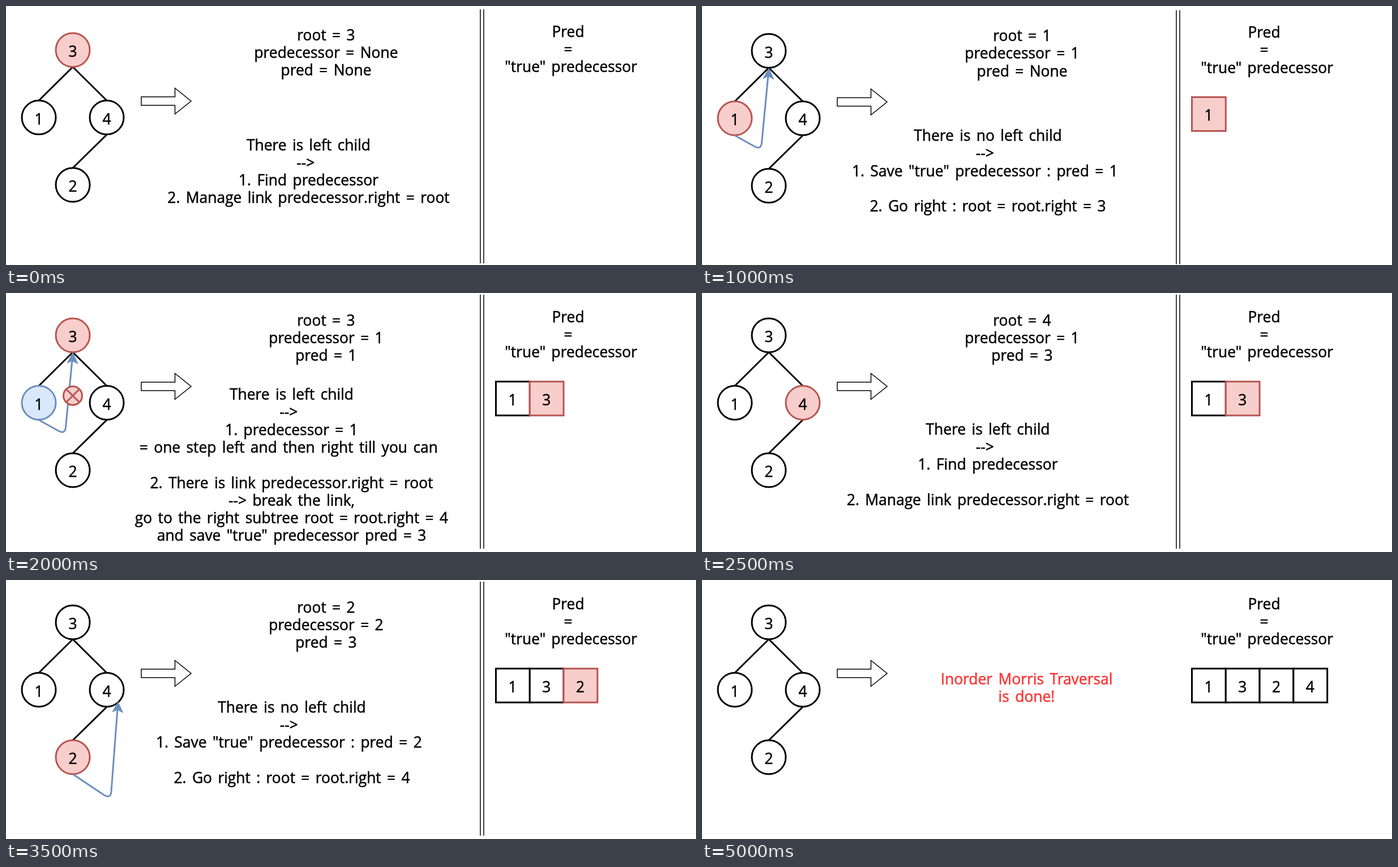
Write an HTML page that moves like this. It is 1219x459 px and loops after 5.5 s.

```html
<!DOCTYPE html>
<html lang="en">
<head>
<meta charset="utf-8">
<title>Inorder traversal</title>
<style>
  html, body { margin: 0; width: 100%; height: 100%; overflow: hidden; background: #fff; }
  svg { display: block; width: 100%; height: 100%; }
  text {
    font: 26.4px "Open Sans", "Noto Sans", sans-serif; word-spacing: 3.5px;
    text-anchor: middle; white-space: pre; stroke-width: 0.5px;
  }
</style>
</head>
<body>
<svg id="stage" viewBox="0 0 1219 459"></svg>
<script>
const STEP = 500, PITCH = 31.3;
const BLACK = ['#fff', '#000'], RED = ['#f8cecc', '#b85450'], BLUE = ['#dae8fc', '#6c8ebf'];
const NODES = { 3: [118, 78], 1: [58, 197.5], 4: [178, 197.5], 2: [118, 317] };
const LINKS = {
  1: ['M58 228L92 247Q104 254 105.5 241L117 121', 'M118 109L127 128.5L117 123L108 127Z'],
  2: ['M118 347L173 384Q185 391 186 378L197 231', 'M198 219L206.5 238L197 233L188 236.5Z']
};

const seek = ['There is left child', '--> ', '1. Find predecessor'];
const manage = '2. Manage link predecessor.right = root';
const walk = '= one step left and then right till you can';
const leaf = (n, next) => ['There is no left child', '--> ', `1. Save "true" predecessor : pred = ${n} `, '',
  `2. Go right : root = root.right = ${next}`];
const setLink = (label, n) => ['There is left child', '--> ', `1. ${label} = ${n}`, walk, '',
  '2. There is no link predecessor.right = root', '--> set the link ',
  `and go to the left subtree root = root.left = ${n}`];
const breakLink = (n, next, saved) => ['There is left child', '--> ', `1. predecessor = ${n}`, walk + ' ', '',
  '2. There is link predecessor.right = root', '--> break the link,',
  `go to the right subtree root = root.right = ${next}`, `and save "true" predecessor pred = ${saved}`];

// dy: shift of the upper drawing; vars: root, predecessor, pred; note: centre x, first baseline, lines
const STATES = [
  { dy: 0, vars: [3, 'None', 'None'], note: [534.5, 255.5, [...seek, manage]], list: '' },
  { dy: 1.5, vars: [3, 'None', 'None'], blue: 1, link: 1, note: [506, 208, setLink('Predecessor', 1)], list: '' },
  { dy: 1.5, vars: [1, 1, 'None'], link: 1, note: [505, 239, leaf(1, 3)], list: '1' },
  { dy: 1.5, vars: [3, 1, 1], link: 1, note: [505, 255.5, [...seek, '', manage]], list: '1' },
  { dy: -3, vars: [3, 1, 1], blue: 1, link: 1, cross: [118, 185], note: [504.5, 189, breakLink(1, 4, 3)], list: '13' },
  { dy: -3, vars: [4, 1, 3], note: [505, 250.5, [...seek, '', manage]], list: '13' },
  { dy: -3, vars: [4, 1, 3], blue: 2, link: 2, note: [504.5, 189, setLink('predecessor', 2)], list: '13' },
  { dy: -3, vars: [2, 2, 3], link: 2, note: [505, 234.5, leaf(2, 4)], list: '132' },
  { dy: -3, vars: [4, 2, 2], link: 2, note: [505, 234.5, [...seek, '', manage]], list: '132' },
  { dy: -3, vars: [4, 2, 2], link: 2, cross: [187, 303], note: [504.5, 196, breakLink(2, 'None', 4)], list: '1324' },
  { dy: -3, done: true, list: '1324' }
];

const text = (x, y, s, fill = '#000') => `<text x="${x}" y="${y}" fill="${fill}" stroke="${fill}">${s}</text>`;
const lines = (x, y, list, fill) => list.map((s, i) => text(x, y + i * PITCH, s, fill)).join('');
const path = (d, stroke, width = 3, fill = 'none') =>
  `<path d="${d}" fill="${fill}" stroke="${stroke}" stroke-width="${width}"/>`;
const disc = ([x, y], r, [fill, stroke]) =>
  `<circle cx="${x}" cy="${y}" r="${r}" fill="${fill}" stroke="${stroke}" stroke-width="3"/>`;

function cells(list, done) {
  return [...list].map((n, i) => {
    const x = 865.5 + i * 59.8, last = !done && i === list.length - 1;
    const [fill, stroke] = last ? RED : BLACK;
    return path(`M${x} 160h59.8v60h-59.8z`, stroke, 3, fill) + text(x + 29.5, 201.5, n);
  }).join('');
}

function draw({ dy, vars, blue, link, cross, note, list, done }) {
  let top = path('M118 108L58 167.5M118 108L178 167.5M178 228L118 287', '#000');
  for (const n in NODES) {
    const [x, y] = NODES[n];
    const look = vars && n == vars[0] ? RED : n == blue ? BLUE : BLACK;
    top += disc([x, y], 30, look) + text(x, y + 12, n);
  }
  top += path('M239 161H298.5V145.5L327 168.5L298.5 191.5V176H239Z', '#000', 1.5);
  if (link) top += path(LINKS[link][0], BLUE[1]) + path(LINKS[link][1], BLUE[1], 1, BLUE[1]);
  if (cross) {
    const [x, y] = cross;
    top += disc(cross, 16.5, RED) +
      path(`M${x - 11.5} ${y - 11.5}l23 23m0 -23l-23 23`, RED[1]);
  }
  top += lines(993, 54.5, ['Pred', '=', ' "true" predecessor']) + cells(list, done);
  if (!done) {
    const [root, predecessor, pred] = vars;
    top += path('M838 6V456M844 6V456', '#000', 1.5) +
      lines(565.5, 60.5, [`root = ${root}`, `predecessor = ${predecessor}`, `pred = ${pred}`]);
  }
  const below = done
    ? lines(573.5, 184.5, ['Inorder Morris Traversal', 'is done!'], '#ff3333')
    : lines(...note.slice(0, 2), note[2].map(s => s.replace(/>/g, '&gt;')));
  return `<g transform="translate(0 ${dy})">${top}</g>${below}`;
}

const stage = document.getElementById('stage');
let shown = -1;
function frame() {
  const i = Math.floor(performance.now() / STEP) % STATES.length;
  if (i !== shown) stage.innerHTML = draw(STATES[shown = i]);
  requestAnimationFrame(frame);
}
frame();
</script>
</body>
</html>
```
